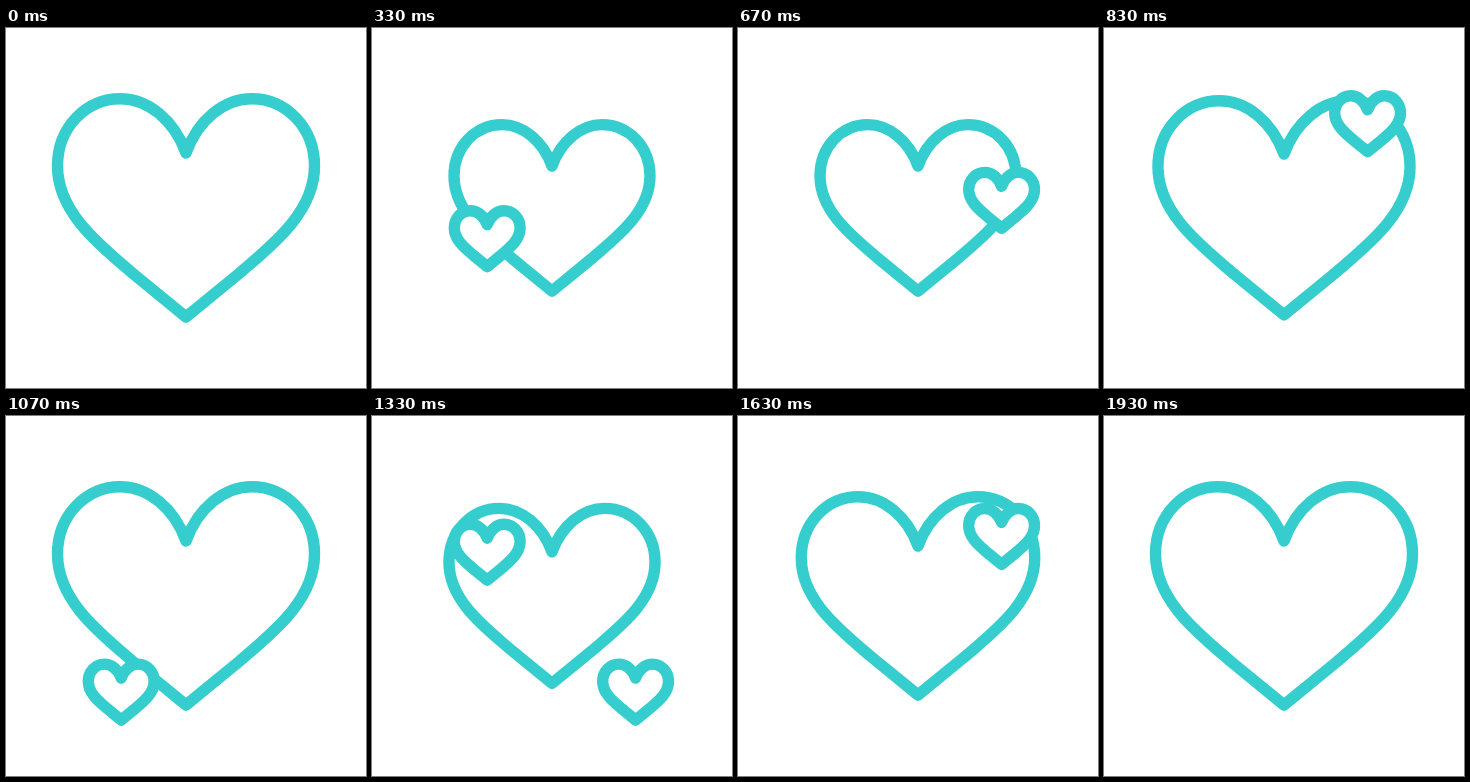
These frames come from a looping animation (360 px wide and 360 px high, 2 s). An HTML page:

```html
<!DOCTYPE html>
<html lang="en">
<head>
<meta charset="utf-8">
<title>Beating heart</title>
<style>
  html, body { margin: 0; width: 100%; height: 100%; overflow: hidden; background: #fff; }
  svg { display: block; width: 100vw; height: 100vh; }
  use {
    fill: #fff;
    stroke: #35cdce;
    stroke-width: 11.4;
    stroke-linejoin: round;
  }
  #shape { vector-effect: non-scaling-stroke; }
</style>
</head>
<body>
<svg viewBox="0 0 360 360">
  <defs>
    <path id="shape" d="M0-55C12-88 38-109.3 65.7-109.3C100.5-109.3 128.5-80 128.5-42C128.5 5 85 38 53 65.6L0 109L-53 65.6C-85 38-128.5 5-128.5-42C-128.5-80-100.5-109.3-65.7-109.3C-38-109.3-12-88 0-55Z"/>
  </defs>
  <use id="big" href="#shape"/>
  <use id="left" href="#shape"/>
  <use id="right" href="#shape"/>
</svg>
<script>
  const LOOP = 2000, FPS = 30;
  const RISE = 18; // frames a small heart takes to float up
  const DEPTH = 0.2425; // how far the big heart shrinks on a beat
  const beats = [[4, 11], [15, 11], [36.3, 10.3], [46.6, 11.4]]; // start, length
  const floaters = [
    { el: document.getElementById('left'), x: 115.2, starts: [2, 28] },
    { el: document.getElementById('right'), x: 263.6, starts: [10, 36] }
  ];
  const big = document.getElementById('big');

  function place(el, x, y, scale) {
    el.setAttribute('transform', `translate(${x} ${y}) scale(${scale})`);
  }

  function bigScale(frame) {
    const beat = beats.find(([start, length]) => frame >= start && frame < start + length);
    if (!beat) return 1;
    const phase = (frame - beat[0]) / beat[1];
    return 1 - DEPTH * (1 - Math.cos(2 * Math.PI * phase)) / 2;
  }

  function draw(frame) {
    place(big, 180, 180, bigScale(frame));
    for (const { el, x, starts } of floaters) {
      const start = starts.find(s => frame > s && frame < s + RISE);
      const visible = start !== undefined;
      el.style.display = visible ? '' : 'none';
      if (visible) {
        const y = 191.5 + 110.5 * Math.cos(Math.PI * (frame - start) / RISE);
        place(el, x, y, 0.256);
      }
    }
  }

  const origin = performance.now();
  function tick() {
    const time = (performance.now() - origin) % LOOP;
    // small lead, as frame starts are rounded to 10 ms
    draw(Math.floor((time + 4) * FPS / 1000) % 60);
    requestAnimationFrame(tick);
  }
  tick();
</script>
</body>
</html>
```
